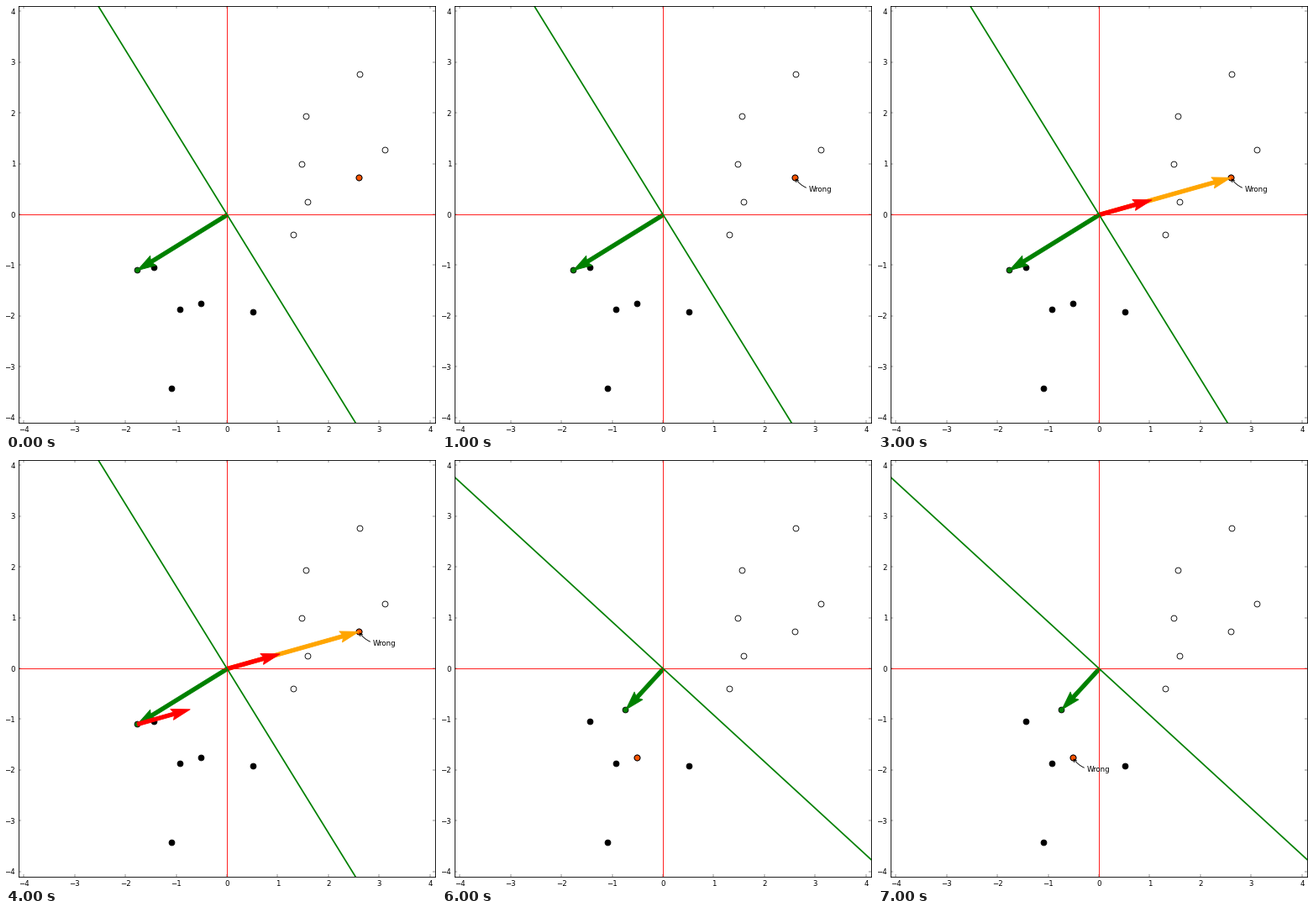
Write a matplotlib script that moves like this. It is 512 px wide and 507 px high and loops after 8 s.

```python
import numpy as np
import matplotlib.pyplot as plt
from matplotlib.animation import FuncAnimation

W, H, DPI = 512, 507, 64
LEFT, SIDE = 15, 496
LIMIT = 4.1
FONT = 9.75
LINE = 0.975
RATE = 0.4
PHASES = 6  # pick, label, sample arrow, scaled arrow, shifted arrow, updated weights

white = np.array([(2.62, 2.76), (1.56, 1.93), (3.11, 1.28), (1.47, 1.0),
                  (2.59, 0.73), (1.59, 0.25), (1.31, -0.4)])
black = np.array([(-1.44, -1.04), (-0.92, -1.87), (-0.52, -1.75),
                  (0.51, -1.91), (-1.09, -3.42)])
origin = np.zeros(2)
start_weights = np.array([-1.773, -1.095])

# Perceptron rule: samples of the white class pull the weights, black ones push.
picks = [(white[4], 1), (black[2], -1)]
steps = [sign * RATE * sample for sample, sign in picks]
weights = start_weights + np.cumsum([origin] + steps, axis=0)

plt.rcParams["font.family"] = "DejaVu Sans"
fig = plt.figure(figsize=(W / DPI, H / DPI), dpi=DPI, facecolor="white")
ax = fig.add_axes([LEFT / W, (H - SIDE) / H, SIDE / W, SIDE / H])
ax.set(xlim=(-LIMIT, LIMIT), ylim=(-LIMIT, LIMIT),
       xticks=range(-4, 5), yticks=range(-4, 5))
ax.tick_params(direction="in", top=True, right=True, length=3.9, width=0.5,
               pad=4.2, labelsize=FONT)
for spine in ax.spines.values():
    spine.set_linewidth(LINE)
ax.axhline(0, color="red", lw=LINE)
ax.axvline(0, color="red", lw=LINE)


def dots(points, color):
    x, y = np.atleast_2d(points).T
    return ax.scatter(x, y, s=59, c=color, edgecolors="black", linewidths=LINE, zorder=1)


def arrow(start, vec, color):
    return ax.quiver(*start, *vec, angles="xy", scale_units="xy", scale=1, width=0.009,
                     facecolor=color, edgecolor=color, linewidth=LINE, zorder=1)


def boundary(w):
    """Line through the origin at right angles to the weights."""
    x = np.array([-5, 5])
    return ax.plot(x, -x * w[0] / w[1], color="green", lw=1.95, zorder=2)[0]


def label(point):
    return ax.annotate("Wrong", point, xytext=(19.5, -19.5), textcoords="offset points",
                       fontsize=FONT,
                       arrowprops=dict(arrowstyle="->", connectionstyle="arc3,rad=-0.3",
                                       linewidth=LINE))


dots(white, "white")
dots(black, "black")
shown = []


def draw(frame):
    while shown:
        shown.pop().remove()
    turn, phase = divmod(frame, PHASES)
    sample, step = picks[turn][0], steps[turn]
    updated = phase == PHASES - 1
    w = weights[turn + updated]

    shown.extend([dots(sample, "#ff5500"), dots(w, "green"),
                  boundary(w), arrow(origin, w, "green")])
    if phase >= 1:
        shown.append(label(sample))
    if phase >= 2:
        shown.append(arrow(origin, sample, "orange"))
    if phase >= 3:
        shown.append(arrow(origin, step, "red"))
    if phase >= 4:
        shown.append(arrow(weights[turn], step, "red"))
    return shown


anim = FuncAnimation(fig, draw, frames=8, interval=1000, repeat=True, repeat_delay=0)
plt.show()
```
